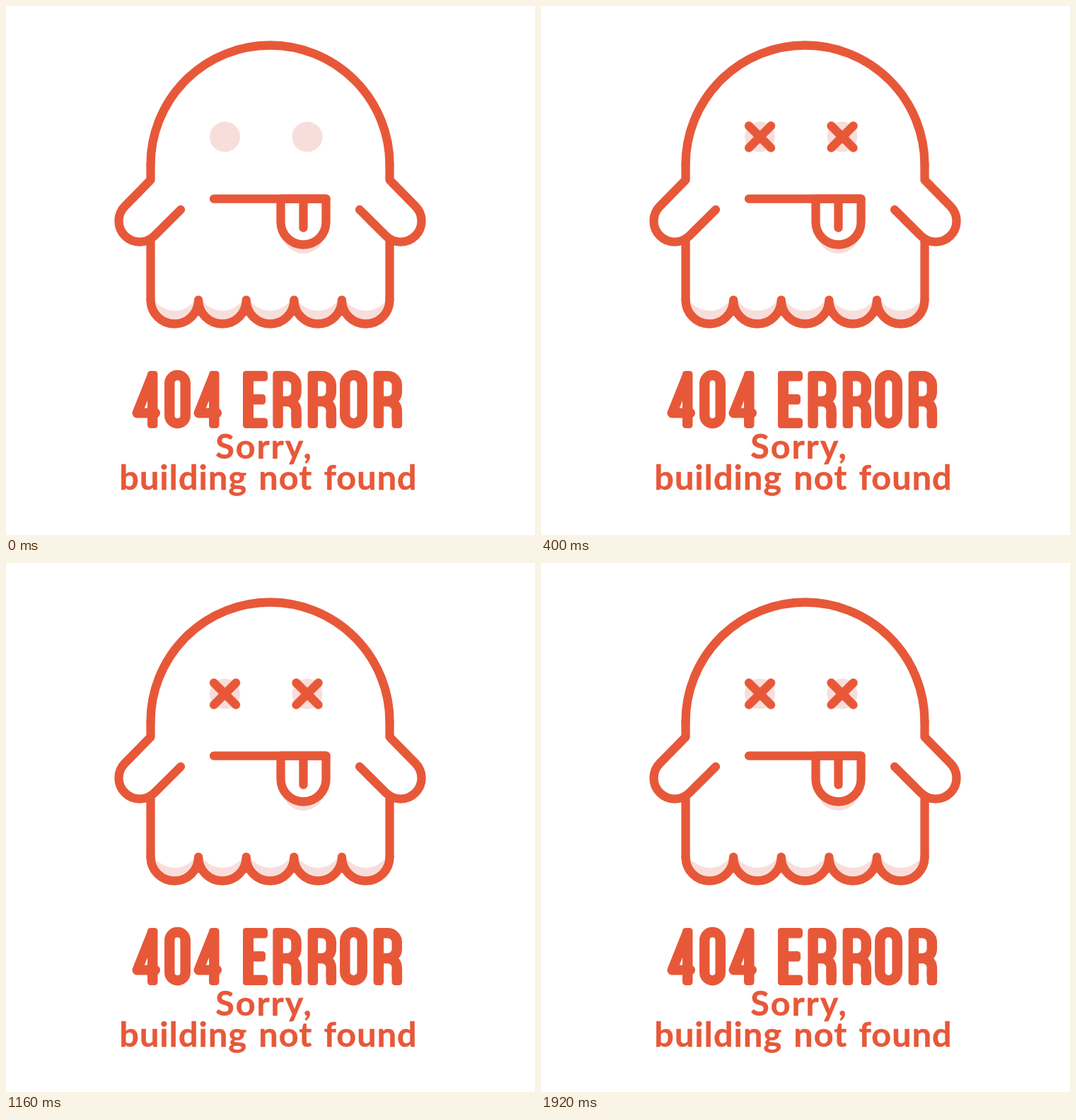
An HTML page that plays this animation: 748x748 px, repeating every 2 s.

```html
<!DOCTYPE html>
<html lang="en">
<head>
<meta charset="utf-8">
<title>404 Error</title>
<style>
  html, body { margin: 0; width: 100%; height: 100%; overflow: hidden; background: #fff; }
  svg { display: block; width: 100vw; height: 100vh; --ink: #e75839; --tint: #f8dedb; }

  .line { fill: none; stroke: var(--ink); stroke-width: 12.3; stroke-linecap: round; stroke-linejoin: round; }
  .tint { fill: var(--tint); }

  .cross { transform-box: view-box; animation: pop 2s linear infinite; }
  .left { transform-origin: 309.5px 185px; }
  .right { transform-origin: 426px 185px; }

  .title { fill: var(--ink); animation: blink 2s linear infinite; }
  .bar { rx: 4.5px; }
  .bow { fill: none; stroke: var(--ink); stroke-width: 14.5; stroke-linejoin: round; }
  .slant { fill: none; stroke: var(--ink); stroke-width: 14; stroke-linejoin: round; stroke-linecap: round; }

  .note {
    font: 700 48.5px Lato, "Open Sans", sans-serif;
    fill: var(--ink); stroke: var(--ink); stroke-width: .5; stroke-linejoin: round;
    text-anchor: middle; letter-spacing: 1.1px; word-spacing: 3.2px;
  }
  .note .wide { letter-spacing: 2px; }

  /* Both motions advance in 40 ms ticks. */
  @keyframes pop {
    0% { transform: scale(0); animation-timing-function: steps(5); }
    10% { transform: scale(1.2); animation-timing-function: steps(5); }
    20%, 100% { transform: scale(1); }
  }
  @keyframes blink {
    0%, 20%, 38%, 58%, 76%, 96%, 100% { opacity: 1; animation-timing-function: steps(5); }
    10%, 48%, 86% { opacity: 0; animation-timing-function: steps(5); }
  }
</style>
</head>
<body>
<svg viewBox="0 0 748 748">
  <defs>
    <path id="side" d="M204.5 224.5V246L168.1 283.1A29.5 29.5 0 0 0 209.9 324.9L247 288M204.5 330V415.7"/>
    <path id="fold" d="M2.8 412a34.8 34.8 0 0 0 62 0L67.6 415.7A33.8 33.8 0 0 1 0 415.7z"/>
    <g id="four">
      <rect class="bar" x="29" width="14.5" y="516" height="81"/>
      <path class="slant" d="M35.5 523L14.5 575.5H40"/>
    </g>
    <g id="r">
      <rect class="bar" width="14.5" y="516" height="81"/>
      <rect class="bar" x="26" width="14.5" y="572" height="25"/>
      <path class="bow" d="M7.3 523.3H20.2a13 13 0 0 1 13 13V546a13 13 0 0 1-13 13H7.3M20.2 559a13 13 0 0 1 13 13V585"/>
    </g>
  </defs>

  <g class="tint">
    <use href="#fold" x="204.5"/>
    <use href="#fold" x="272.1"/>
    <use href="#fold" x="339.7"/>
    <use href="#fold" x="407.3"/>
    <use href="#fold" x="474.9"/>
    <circle cx="309.5" cy="185" r="21.5"/>
    <circle cx="426" cy="185" r="21.5"/>
    <circle cx="420.5" cy="320" r="30"/>
  </g>

  <g class="line">
    <path d="M204.5 224.5a169 169 0 0 1 338 0"/>
    <use href="#side"/>
    <use href="#side" transform="matrix(-1 0 0 1 747 0)"/>
    <path d="M204.5 415.7a33.8 33.8 0 0 0 67.6 0a33.8 33.8 0 0 0 67.6 0a33.8 33.8 0 0 0 67.6 0a33.8 33.8 0 0 0 67.6 0a33.8 33.8 0 0 0 67.6 0"/>
    <path fill="#fff" d="M388.5 272.7V305.5a32 32 0 0 0 64 0V272.7z"/>
    <path d="M294 272.7H452.5M420.5 272.7V313.7"/>
    <path class="cross left" d="M293.9 169.4l31.2 31.2m0-31.2l-31.2 31.2"/>
    <path class="cross right" d="M410.4 169.4l31.2 31.2m0-31.2l-31.2 31.2"/>
  </g>

  <g class="title" role="img" aria-label="404 ERROR">
    <use href="#four" x="171"/>
    <path class="bow" d="M231.3 533.3a11.2 11.2 0 0 1 22.4 0V579a11.2 11.2 0 0 1-22.4 0z"/>
    <use href="#four" x="258"/>
    <rect class="bar" x="335" width="15" y="516" height="81"/>
    <rect class="bar" x="335" width="35" y="516" height="14.5"/>
    <rect class="bar" x="335" width="32" y="549" height="14.5"/>
    <rect class="bar" x="335" width="35" y="582.5" height="14.5"/>
    <use href="#r" x="377.3"/>
    <use href="#r" x="426.6"/>
    <path class="bow" d="M479.3 534.3a12.2 12.2 0 0 1 24.4 0V578a12.2 12.2 0 0 1-24.4 0z"/>
    <use href="#r" x="519.6"/>
  </g>

  <g class="note">
    <text class="wide" x="365" y="640">Sorry,</text>
    <text x="371" y="684">building not found</text>
  </g>
</svg>
</body>
</html>
```
